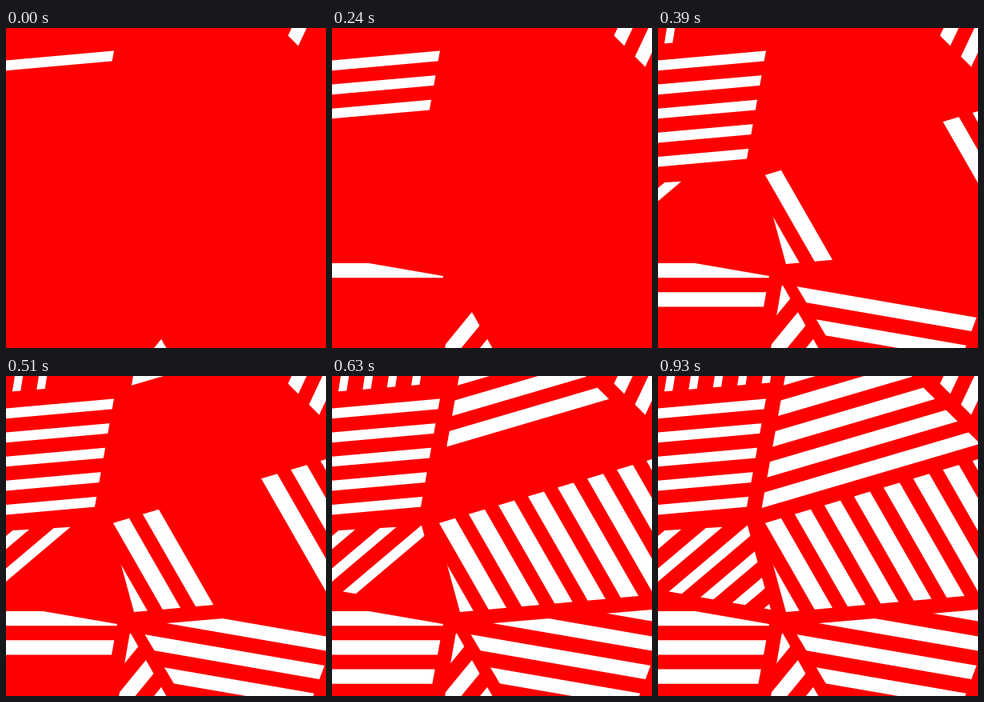
Animation, 400 px wide and 400 px high, one loop 1.23 s. Source, as an HTML page with a canvas:

```html
<!DOCTYPE html>
<html lang="en">
<head>
<meta charset="utf-8">
<title>Stripes</title>
<style>
  html, body { margin: 0; width: 100%; height: 100%; overflow: hidden; background: #f00; }
  canvas { display: block; width: 100%; height: 100%; }
</style>
</head>
<body>
<canvas width="400" height="400"></canvas>
<script>
const LOOP = 1230;
const REACH = 600;

// Order in which the stripes of a panel pop in.
const forward = i => i;
const backward = (i, count) => count - 1 - i;
const inward = (i, count) => Math.min(i, count - 1 - i);

// Each panel is an outline filled with evenly spaced parallel stripes:
// at = corner of the first, dir = along it, step = to the next, fill = white share of a step.
// The first stripe shows at start, each later one after another gap (ms).
const panels = [
  { outline: '0,0 140,0 110,169 0,175',
    at: [0, 40.5], dir: [1, -.089], step: [0, 30.1], fill: .42,
    count: 5, start: 0, gap: 90, order: forward },
  { outline: '343,0 400,0 400,57',
    at: [357, 0], dir: [-.47, 1], step: [38.5, 0], fill: .49,
    count: 2, start: 0, gap: 150, order: forward },
  { outline: '155,320 201,401 141,401',
    at: [156, 321], dir: [-.82, 1], step: [19, 34], fill: .5,
    count: 3, start: 0, gap: 180, order: backward },
  { outline: '0,286 139,310 125,387 0,387',
    at: [0, 294], dir: [1, 0], step: [0, 36.3], fill: .5,
    count: 3, start: 240, gap: 150, order: forward },
  { outline: '0,0 145,0 145,8 0,20',
    at: [11, 0], dir: [-.16, 1], step: [30, 0], fill: .34,
    count: 5, start: 360, gap: 90, order: forward },
  { outline: '0,193.5 112,187 141,292 0,267',
    at: [0, 200], dir: [1, -.845], step: [0, 40.5], fill: .405,
    count: 6, start: 330, gap: 120, order: forward },
  { outline: '130,185 400,104 400,273.5 160,295',
    at: [90.6, 184], dir: [.573, 1], step: [43.4, 0], fill: .54,
    count: 9, start: 270, gap: 90, order: inward },
  { outline: '159,0 317,0 400,82 400,100 127,180',
    at: [0, 39.3], dir: [1, -.2935], step: [0, 36.3], fill: .51,
    count: 5, start: 450, gap: 90, order: forward },
  { outline: '167,312 400,292 400,357 384,400 219,400',
    at: [0, 219.3], dir: [1, .173], step: [0, 36.9], fill: .49,
    count: 4, start: 270, gap: 120, order: backward }
];

const ctx = document.querySelector('canvas').getContext('2d');

function drawStripe({ at, dir, step, fill }, i) {
  const corner = (n, side) =>
    ctx.lineTo(...at.map((v, k) => v + n * step[k] + side * REACH * dir[k]));
  ctx.beginPath();
  corner(i, -1);
  corner(i, 1);
  corner(i + fill, 1);
  corner(i + fill, -1);
  ctx.fill();
}

function drawPanel(panel, t) {
  const { outline, count, start, gap, order } = panel;
  ctx.save();
  ctx.clip(new Path2D(`M${outline}Z`));
  for (let i = 0; i < count; i++) {
    if (t >= start + gap * order(i, count)) drawStripe(panel, i);
  }
  ctx.restore();
}

function draw() {
  const t = performance.now() % LOOP;
  ctx.fillStyle = '#f00';
  ctx.fillRect(0, 0, 400, 400);
  ctx.fillStyle = '#fff';
  for (const panel of panels) drawPanel(panel, t);
  requestAnimationFrame(draw);
}
draw();
</script>
</body>
</html>
```
